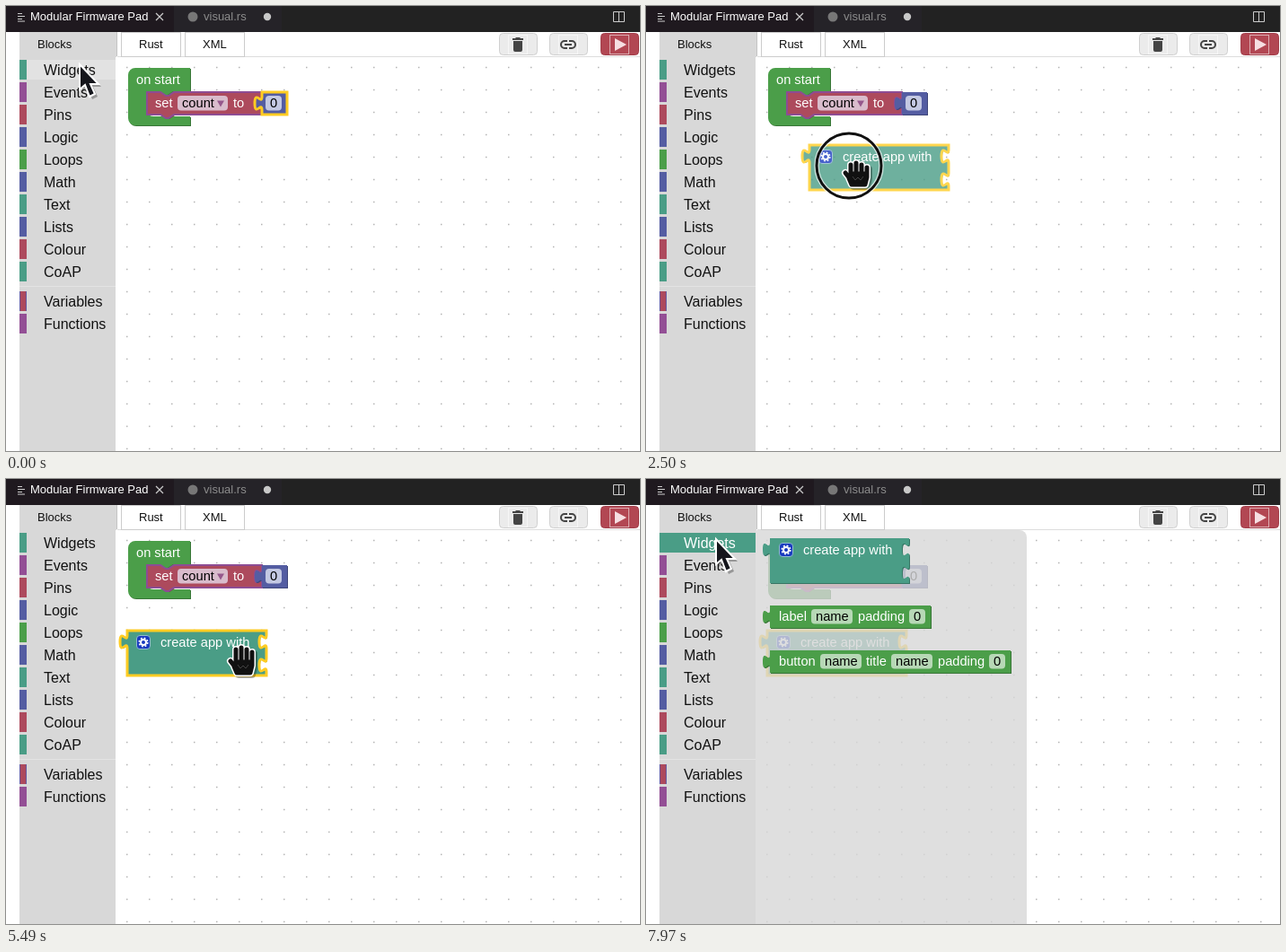
An HTML page that plays this animation: 706 by 496 pixels, repeating every 8 s.

```html
<!DOCTYPE html>
<html lang="en">
<head>
<meta charset="utf-8">
<title>Block editor</title>
<style>
html, body { margin: 0; width: 100%; height: 100%; overflow: hidden; background: #fff; }
svg { display: block; width: 706px; height: 496px; font: 14.67px "Liberation Sans", Arial, sans-serif; }
.ui { font-size: 13px; }
.row { font-size: 16px; }
</style>
</head>
<body>
<svg id="stage" viewBox="0 0 706 496"></svg>
<script>
const TEAL = '#4a9d86', GREEN = '#4b9e49', RED = '#ad4a5d', PURPLE = '#934f95', BLUE = '#545da2';
const CATEGORIES = [['Widgets', TEAL], ['Events', PURPLE], ['Pins', RED], ['Logic', BLUE], ['Loops', GREEN],
  ['Math', BLUE], ['Text', TEAL], ['Lists', BLUE], ['Colour', RED], ['CoAP', TEAL],
  ['Variables', RED], ['Functions', PURPLE]];

// Puzzle connectors: a socket is drawn downwards, a tab upwards.
const SOCKET = 'c0,10 -8,-8 -8,7.5 s8,-2.5 8,7.5';
const TAB = 'V20 c0,-10 -8,8 -8,-7.5 s8,2.5 8,-7.5 z';
const valueShape = w => `M0,0 H${w} V25 H0 ${TAB}`;
const APP_SHAPE = `M0,0 H155 v5 ${SOCKET} v11 ${SOCKET} V50 H0 ${TAB}`;
const SET_SHAPE = `M0,0 H15 l6,4 h3 l6,-4 H128 v5 ${SOCKET} V25 H30 l-6,4 h-3 l-6,-4 H0 z`;
const START_SHAPE = 'M0,8 a8,8 0 0 1 8,-8 H69 V26 H50 l-6,4 h-3 l-6,-4 h-7 a8,8 0 0 0 -8,8 v12' +
  ' a8,8 0 0 0 8,8 H69 V64 H8 a8,8 0 0 1 -8,-8 z';

const rect = (x, y, w, h, fill, more = '') =>
  `<rect x="${x}" y="${y}" width="${w}" height="${h}" fill="${fill}" ${more}/>`;
const text = (x, y, s, fill = '#fff', cls = '') => `<text x="${x}" y="${y}" fill="${fill}" class="${cls}">${s}</text>`;
const path = (d, fill, more = '') => `<path d="${d}" fill="${fill}" ${more}/>`;
const line = (d, color, width = 1) => path(d, 'none', `stroke="${color}" stroke-width="${width}"`);
const at = (x, y, inner, more = '') => `<g transform="translate(${x} ${y})" ${more}>${inner}</g>`;
const field = (x, w, s, fill) => rect(x, 4, w, 16.5, fill, 'rx="4"') + text(x + 5, 17, s, '#000');

function shape(d, color, selected) {
  return path(d, color, 'transform="translate(1 1)" style="filter:brightness(.75)"') +
    path(d, color, selected ? 'stroke="#fc2" stroke-width="3"' : '');
}

function appBlock(selected) {
  return shape(APP_SHAPE, TEAL, selected) +
    rect(10.5, 5.5, 15, 15, '#1739bf', 'rx="3.5" stroke="#8fb8cf"') +
    '<g fill="none" stroke="#fff"><circle cx="18" cy="13" r="3" stroke-width="2"/>' +
    '<circle cx="18" cy="13" r="4.8" stroke-width="1.6" stroke-dasharray="1.9 1.87"/></g>' +
    text(37, 18, 'create app with');
}

function labelBlock() {
  return shape(valueShape(179), GREEN) + text(10, 17, 'label') + field(46, 46, 'name', '#b7d8b6') +
    text(98, 17, 'padding') + field(155, 18, '0', '#b7d8b6');
}

function buttonBlock() {
  return shape(valueShape(268), GREEN) + text(10, 17, 'button') + field(56, 46, 'name', '#b7d8b6') +
    text(107, 17, 'title') + field(135, 46, 'name', '#b7d8b6') +
    text(187, 17, 'padding') + field(244, 18, '0', '#b7d8b6');
}

function startBlocks(selected) {
  return at(136, 69, shape(START_SHAPE, GREEN) + text(9, 18, 'on start')) +
    at(157, 96, shape(SET_SHAPE, RED) + line(SET_SHAPE, '#8d4c94', 2) +
      text(9, 17, 'set') + field(34, 56, 'count', '#d9bccc') + path('M78,9.5 h8 l-4,7 z', '#96588c') +
      text(96, 17, 'to')) +
    at(285, 96, shape(valueShape(28), BLUE, selected) + field(4, 18, '0', '#c3c8e2'));
}

function titleBar() {
  return rect(0, 0, 706, 29, '#222') + rect(0, 0, 187, 29, '#1f191f') + rect(187, 0, 120, 29, '#252328') +
    line('M13,8.5 h5 M13,11.5 h8 M13,14.5 h5 M13,17 h8', '#ccc') +
    text(27, 16, 'Modular Firmware Pad', '#fff', 'ui') +
    line('M167,8 l8,8 m0,-8 l-8,8', '#ccc', 1.2) +
    '<circle cx="208" cy="12" r="5.5" fill="#777"/>' + text(220, 16, 'visual.rs', '#8c8c8c', 'ui') +
    '<circle cx="291" cy="12" r="4.2" fill="#c8c8c8"/>' +
    line('M676.5,6.5 h12 v11 h-12 z M682.5,6.5 v11', '#ccc');
}

function toolBar() {
  const button = (x, fill, edge, icon) => rect(x + .5, 30.5, 42, 24, fill, `rx="4" stroke="${edge}"`) +
    rect(x + 10.5, 32.5, 21, 21, 'none', 'stroke="#fff" stroke-opacity=".55"') + at(x + 21, 43, icon);
  return line('M124,56.5 H706', '#ddd') + rect(15, 29, 108, 28, '#d8d8d8') + line('M123.5,29 V56', '#c4c4c4') +
    rect(128.5, 29.5, 66, 27, '#fff', 'stroke="#ccc"') + rect(199.5, 29.5, 66, 27, '#fff', 'stroke="#ccc"') +
    text(35, 47, 'Blocks', '#111', 'ui') + text(148, 47, 'Rust', '#111', 'ui') + text(219, 47, 'XML', '#111', 'ui') +
    button(549, '#ebebeb', '#d0d0d0', path('M-6,-7 h3 l1,-1 h4 l1,1 h3 v2 h-12 z M-5,-4 h10 v10 q0,2 -2,2 h-6 q-2,0 -2,-2 z', '#444')) +
    button(605, '#ebebeb', '#d0d0d0', line('M-1,-4 h-3 a4,4 0 0 0 0,8 h3 M1,-4 h3 a4,4 0 0 1 0,8 h-3 M-4,0 h8', '#444', 2)) +
    button(662, '#b24753', '#a23e4a', path('M-5,-7 L8,0 L-5,7 z', '#f6dfe2'));
}

function toolbox(hover, open) {
  const rows = CATEGORIES.map(([name, color], i) => {
    const y = 60 + 25 * i + (i > 9 ? 8 : 0), first = i === 0;
    const back = first && open ? rect(15, y, 107, 22, color) : first && hover ? rect(15, y, 107, 22, '#e2e2e2') : '';
    const edge = name === 'Variables' ? line(`M15.5,${y} v22 M22.5,${y} v22`, '#6458a0') : '';
    return back + rect(15, y, 8, 22, color) + edge + text(42, y + 17, name, first && open ? '#fff' : '#111', 'row');
  });
  return rect(15, 57, 107, 439, '#d8d8d8') + line('M15,312.5 H122', '#e4e4e4') + rows.join('');
}

function flyout(selected) {
  return path('M122,57 H416 a8,8 0 0 1 8,8 V496 H122 z', '#d8d8d8', 'opacity=".8"') +
    at(138, 66, appBlock(selected)) + at(138, 141, labelBlock()) + at(138, 191, buttonBlock());
}

function dots() {
  let d = '';
  for (let y = 68; y < 496; y += 25) for (let x = 134; x < 706; x += 25) d += `M${x},${y + .5} h1.5`;
  return line(d, '#b4b4b4', 1.5);
}

function arrow() {
  const d = 'M0,0 V28 L6,23 L11,36 L17,33 L12,22 H21 z';
  return path(d, '#000', 'opacity=".3" transform="translate(3 3)"') +
    path(d, '#15161c', 'stroke="#fff" stroke-width="2"');
}

function hand(grip) {
  const t = grip ? 9 : 13;
  const d = `M-6,4 V${-t} M0,4 V${-t - 2} M6,4 V${-t} M12,4 V${3 - t} M-12,0 L-5,9 M-6,1 H12 V5 L10,13 H-5 L-8,6 z`;
  const stroke = (color, w, more = '') =>
    path(d, color, `stroke="${color}" stroke-width="${w}" stroke-linecap="round" stroke-linejoin="round" ${more}`);
  return stroke('#000', 8, 'opacity=".3" transform="translate(2 2)"') + stroke('#fff', 8) + stroke('#111', 5) +
    line('M-4,4 l3,4 l3,-3 l3,3 l3,-4', '#444');
}

function pointer({ cur, x, y, ring }) {
  const [dx, dy] = cur === 'arrow' ? [-5, -2] : [-8, -8];
  const circle = (color, w) => `<circle cx="${dx}" cy="${dy}" r="${ring}" fill="none" stroke="${color}" stroke-width="${w}"/>`;
  const rings = ring ? circle('#ffffffb0', 5.5) + circle('#111', 3) : '';
  return at(x, y, (cur === 'arrow' ? arrow() : hand(cur === 'grab')) + rings);
}

const arrowAt = (x, y, more) => ({ cur: 'arrow', x, y, ...more });
const drag = (bx, by, x, y) => ({ cur: 'grab', x, y, ring: 36, app: [bx, by], dragging: true });
const placed = { app: [135, 169] };
const POSES = [
  [0, arrowAt(82, 65, { hover: true, zero: true })],
  [480, arrowAt(82, 65, { ring: 58, open: true, zero: true })],
  [1000, arrowAt(123, 89, { open: true, zero: true })],
  [1480, { cur: 'hand', x: 192, y: 97, open: true, picked: true }],
  [1980, { cur: 'grab', x: 302, y: 152, ring: 36, open: true, picked: true }],
  [2500, drag(182, 155, 234, 186)],
  [3000, drag(145, 154, 199, 186)],
  [3500, drag(140, 157, 195, 190)],
  [4000, drag(141, 158, 196, 191)],
  [4480, drag(135, 169, 190, 202)],
  [5010, arrowAt(292, 188, placed)],
  [5490, { cur: 'hand', x: 262, y: 203, ...placed }],
  [5990, arrowAt(112, 109, placed)],
  [6470, arrowAt(78, 67, { hover: true, ...placed })],
  [6990, arrowAt(78, 67, { hover: true, ring: 58, ...placed })],
  [7470, arrowAt(78, 67, { open: true, ...placed })]
];

function scene(p) {
  return rect(0, 0, 706, 496, '#fff') + dots() + startBlocks(p.zero) +
    (p.app ? at(...p.app, appBlock(true), p.dragging ? 'opacity=".8"' : '') : '') +
    (p.open ? flyout(p.picked) : '') +
    titleBar() + toolBar() + toolbox(p.hover, p.open) + pointer(p);
}

const stage = document.getElementById('stage');
let shown;
function tick() {
  const t = performance.now() % 8000;
  const pose = POSES.findLast(([start]) => start <= t)[1];
  if (pose !== shown) stage.innerHTML = scene(shown = pose);
  requestAnimationFrame(tick);
}
tick();
</script>
</body>
</html>
```
